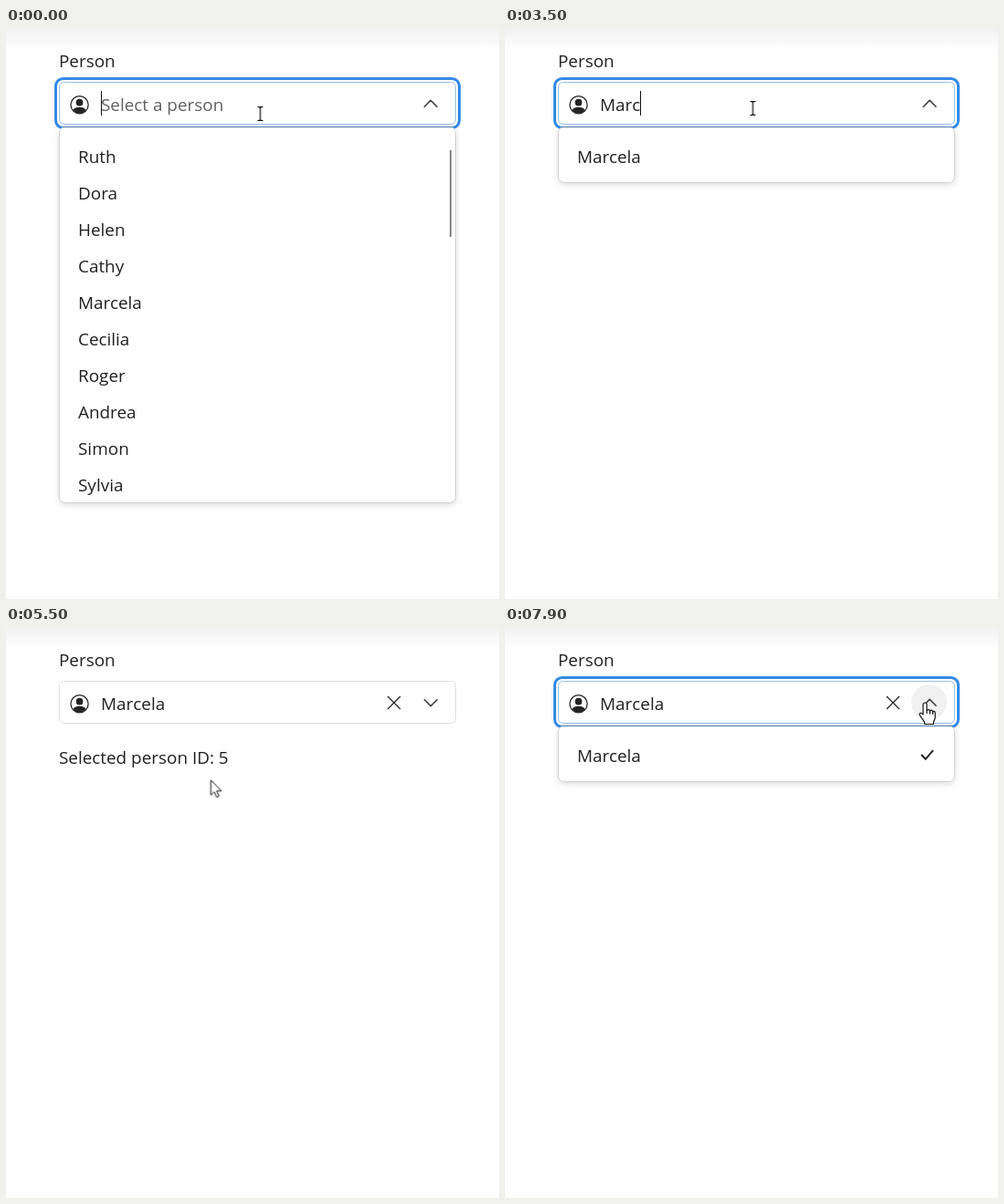
Animation of 540x626 px, one loop 8 s. Source, as an HTML page:

```html
<!DOCTYPE html>
<html lang="en">
<head>
<meta charset="utf-8">
<title>Person picker</title>
<style>
  html, body { margin: 0; width: 100%; height: 100%; overflow: hidden; background: #fff; }
  body { position: relative; font: 18.9px/27px "Open Sans", "Noto Sans", sans-serif; color: #202020; }
  svg { position: absolute; left: 0; top: 0; width: 540px; height: 626px; }
  svg text { fill: #202020; }
  .line { fill: none; stroke: #242424; stroke-width: 1.3; }
  .panel { fill: #fff; stroke: #d1d1d1; filter: drop-shadow(0 2px 3px #0002); }
  .edge { stroke: #4a78a8; }

  .typed { position: absolute; left: 104px; top: 71px; white-space: pre; }
  .typed i { position: absolute; width: 1px; height: 27px; margin-top: -2px; background: #111; }

  /* Hard on/off switches share one 8 s timeline */
  .cue { animation: 8s step-end infinite; }
  .hint { animation-name: hint; }
  .full { animation-name: full; }
  .short { animation-name: short; }
  .ring { animation-name: open; }
  .idle { animation-name: idle; }
  .picked { animation-name: picked; }
  .check { animation-name: reopen; }
  .row { animation-name: row; }
  .halo { animation-name: halo; }
  .k1 { animation-name: k1; }
  .k2 { animation-name: k2; }
  .k3 { animation-name: k3; }
  .k4 { animation-name: k4; }
  .c0 { animation-name: c0; }
  .c2 { animation-name: c2; }
  .c3 { animation-name: c3; }
  .c4 { animation-name: c4; }
  .beam { animation-name: beam; }
  .hand { animation-name: hand; }
  .arrow { animation-name: arrow; }

  @keyframes hint { 0% { opacity: 1 } 21.2%, to { opacity: 0 } }
  @keyframes full { 0% { opacity: 1 } 22.45%, to { opacity: 0 } }
  @keyframes short { 0%, 57.45% { opacity: 0 } 22.45%, 89.95%, to { opacity: 1 } }
  @keyframes open { 0%, 89.95%, to { opacity: 1 } 57.45% { opacity: 0 } }
  @keyframes idle { 0%, 89.95%, to { opacity: 0 } 57.45% { opacity: 1 } }
  @keyframes picked { 0% { opacity: 0 } 57.45%, to { opacity: 1 } }
  @keyframes reopen { 0% { opacity: 0 } 89.95%, to { opacity: 1 } }
  @keyframes row { 0%, 57.45%, to { opacity: 0 } 53.1% { opacity: 1 } }
  @keyframes halo { 0% { opacity: 0 } 86.2%, to { opacity: 1 } }
  @keyframes k1 { 0% { opacity: 0 } 21.2%, to { opacity: 1 } }
  @keyframes k2 { 0% { opacity: 0 } 23.7%, to { opacity: 1 } }
  @keyframes k3 { 0% { opacity: 0 } 27.45%, to { opacity: 1 } }
  @keyframes k4 { 0% { opacity: 0 } 32.45%, to { opacity: 1 } }
  @keyframes c0 { 0%, 9.95% { opacity: 1 } 2.45%, 16.2%, to { opacity: 0 } }
  @keyframes c2 { 0%, 27.45%, to { opacity: 0 } 24.95% { opacity: 1 } }
  @keyframes c3 { 0%, 32.45%, to { opacity: 0 } 27.45% { opacity: 1 } }
  @keyframes c4 { 0%, 48.7%, to { opacity: 0 } 39.95% { opacity: 1 } }
  @keyframes beam { 0%, 42.45%, 58.1% { opacity: 1 } 21.2%, 53.1%, 59.95%, to { opacity: 0 } }
  @keyframes hand { 0%, 58.1% { opacity: 0 } 53.1%, 79.95%, to { opacity: 1 } }
  @keyframes arrow { 0%, 79.95%, to { opacity: 0 } 59.95% { opacity: 1 } }

  .chevron { animation: turn 8s ease-in-out infinite; }
  @keyframes turn {
    0%, 57.5% { transform: rotate(180deg) }
    61.25%, 90% { transform: rotate(0) }
    93.75%, to { transform: rotate(180deg) }
  }

  .pointer { animation: roam 8s ease-in-out infinite; }
  @keyframes roam {
    0%, 10% { transform: translate(278.5px, 94px) }
    16.25%, 42.5% { transform: translate(273.5px, 89px) }
    43.75% { transform: translate(271.5px, 88px) }
    46.25%, 51.25% { transform: translate(264.5px, 87px) }
    53.75%, 56.25% { transform: translate(182px, 128.5px) }
    58.75% { transform: translate(172.5px, 133px) }
    61.9% { transform: translate(166px, 199px) }
    65% { transform: translate(168px, 198px) }
    71.25%, 73.1% { transform: translate(252px, 153px) }
    81.25%, 83.75% { transform: translate(417.5px, 94px) }
    86.9%, to { transform: translate(460px, 83px) }
  }
</style>
</head>
<body>
<svg viewBox="0 0 540 626">
  <defs>
    <linearGradient id="shade" x2="0" y2="1">
      <stop stop-color="#f1f1f1"/>
      <stop offset="1" stop-color="#fff"/>
    </linearGradient>
  </defs>
  <rect width="540" height="24" fill="url(#shade)"/>

  <text x="58" y="43">Person</text>
  <text class="cue picked" x="58" y="150">Selected person ID: 5</text>

  <!-- Field -->
  <rect class="cue idle" x="58.5" y="59.5" width="434" height="46" rx="5" fill="#fff" stroke="#dedede"/>
  <g class="cue ring" fill="#fff">
    <rect x="54.5" y="55.5" width="442" height="54" rx="8" stroke="#338ae6" stroke-width="3"/>
    <rect x="58.5" y="59.5" width="434" height="46" rx="5" stroke="#98bfe8"/>
  </g>
  <g transform="translate(70.3 74) scale(1.28)" fill="#242424">
    <circle cx="8" cy="8" r="7.5" fill="none" stroke="#242424"/>
    <circle cx="8" cy="6" r="3"/>
    <path d="M2.5 12.4C3.2 11.2 4.8 10 8 10s4.8 1.2 5.5 2.4A7 7 0 0 1 2.5 12.4"/>
  </g>
  <text class="cue hint" x="104" y="91" style="fill:#616161">Select a person</text>
  <path class="line cue picked" d="M418 76l14 14m0-14l-14 14"/>
  <circle class="cue halo" cx="464.5" cy="82.5" r="19.5" fill="#f0f0f0"/>
  <g transform="translate(465.2 83)">
    <path class="line chevron" d="M-7.3-3.7L0 3.7L7.3-3.7"/>
  </g>

  <!-- Filtered list -->
  <g class="cue short">
    <rect class="panel" x="58.5" y="108.5" width="434" height="61" rx="6"/>
    <path class="edge" d="M62 108.5H489"/>
    <rect class="cue row" x="59" y="119" width="433" height="40" fill="#ececec"/>
    <text x="79" y="148">Marcela</text>
    <path class="line cue check" d="M456 140l4.7 4.8L469 135.2" style="stroke-width:2"/>
  </g>

  <!-- Whole list -->
  <g class="cue full">
    <rect class="panel" x="58.5" y="108.5" width="434" height="412" rx="6"/>
    <path class="edge" d="M62 108.5H489"/>
    <text x="79" y="148">Ruth</text>
    <text x="79" y="188">Dora</text>
    <text x="79" y="228">Helen</text>
    <text x="79" y="268">Cathy</text>
    <text x="79" y="308">Marcela</text>
    <text x="79" y="348">Cecilia</text>
    <text x="79" y="388">Roger</text>
    <text x="79" y="428">Andrea</text>
    <text x="79" y="468">Simon</text>
    <text x="79" y="508">Sylvia</text>
    <path d="M487 134V229" stroke="#858585" stroke-width="2"/>
  </g>
</svg>

<div class="typed"><i class="cue c0"></i><span class="cue k1">M</span><span class="cue k2">a</span><i class="cue c2"></i><span class="cue k3">r</span><i class="cue c3"></i><span class="cue k4">c</span><i class="cue c4"></i><span class="cue picked">ela</span></div>

<svg viewBox="0 0 540 626">
  <g class="pointer" stroke="#111" stroke-linejoin="round" fill="#fff">
    <path class="cue beam" fill="none" stroke="#000" stroke-width="1.2" d="M-3-7.5h2l1 1 1-1h2M0-6.5v13M-3 7.5h2l1-1 1 1h2"/>
    <g class="cue hand" stroke-width="1.2">
      <path d="M-2 13V2a2 2 0 0 1 4 0V8.6a1.8 1.8 0 0 1 3.4.4a1.8 1.8 0 0 1 3.2.8a1.6 1.6 0 0 1 2.6 1.4V16c0 2.2-1.6 3.6-1.8 5.4V23.5H-.3v-2C-1.5 19-4 17-5.7 13.6c-.9-1.8 1-3 2.3-1.7z"/>
      <path fill="none" d="M2 8.6V12M5.4 9v3.5M8.6 9.8V13"/>
    </g>
    <path class="cue arrow" d="M0 0V16.5l3.8-3.6 2.5 5.9 2.6-1.1-2.5-5.8h5.2z"/>
  </g>
</svg>
</body>
</html>
```
